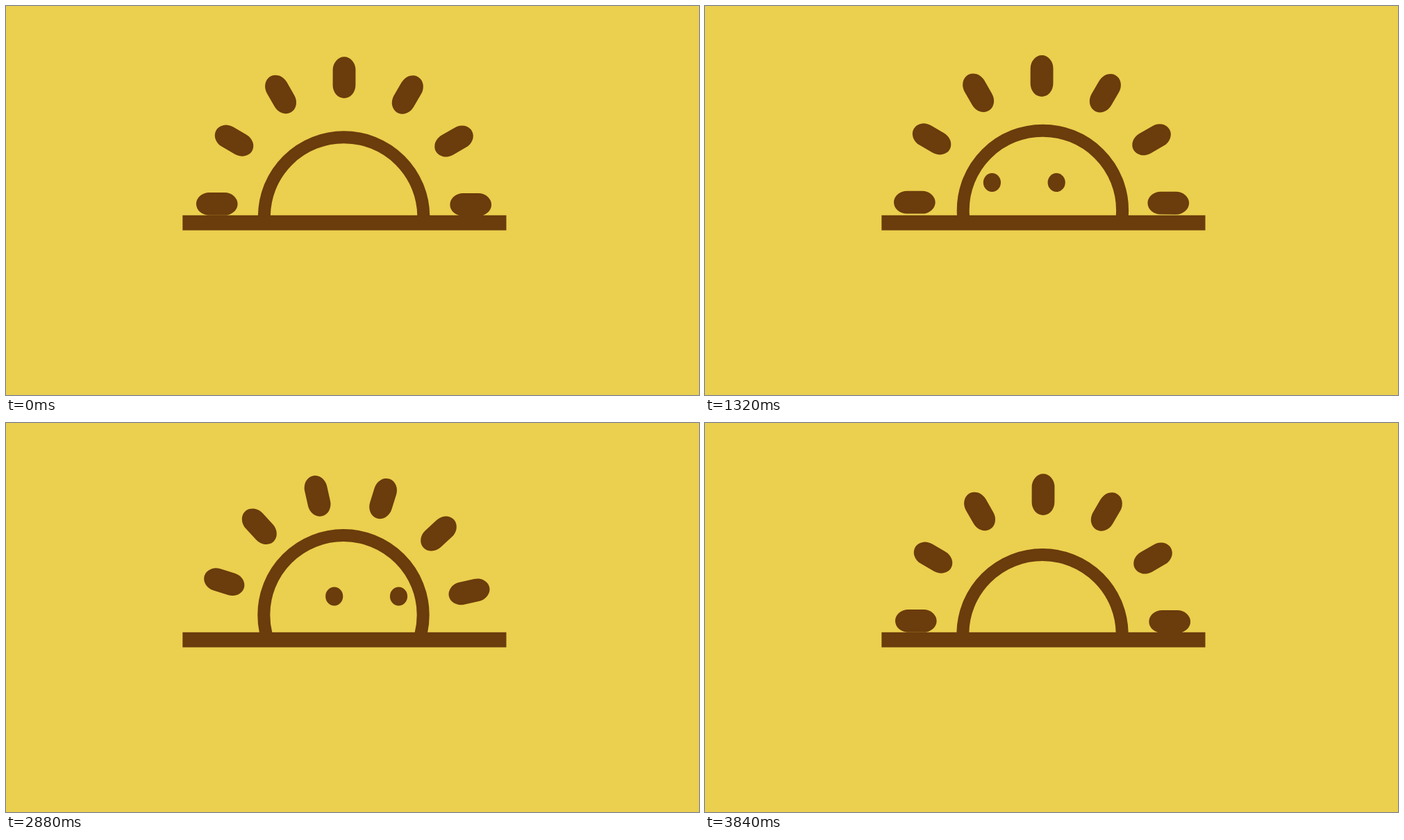
Recreate the animation shown at these times as an HTML page. Size 998 by 561 pixels, loop 4800 ms.

```html
<!DOCTYPE html>
<html lang="en">
<head>
<meta charset="utf-8">
<title>Sunrise</title>
<style>
  html, body { margin: 0; width: 100%; height: 100%; overflow: hidden; background: #ebcf4e; }
  svg { display: block; width: 100%; height: 100%; }
</style>
</head>
<body>
<svg viewBox="0 0 998 561" fill="#6b3c0c">
  <defs>
    <clipPath id="sky"><rect width="998" height="302"/></clipPath>
  </defs>
  <rect width="998" height="561" fill="#ebcf4e"/>
  <g clip-path="url(#sky)">
    <g id="rays"></g>
    <circle id="sun" r="114.7" fill="none" stroke="#6b3c0c" stroke-width="18"/>
    <g id="eyes">
      <ellipse rx="12.6" ry="13.5"/>
      <ellipse cx="92.8" rx="12.6" ry="13.5"/>
    </g>
  </g>
  <rect x="254.3" y="301.8" width="466.2" height="21.7"/>
</svg>
<script>
  const LOOP = 4800, START = 480, STEP = 40, STEPS = 84, PEAK = 60;
  const PIVOT = [486.65, 283.85];
  const NS = 'http://www.w3.org/2000/svg';
  const byId = id => document.getElementById(id);
  const rays = byId('rays'), sun = byId('sun'), eyes = byId('eyes');

  // The ring of rays sits slightly off its pivot, so it wobbles as it turns.
  for (let i = 0; i < 12; i++) {
    const ray = document.createElementNS(NS, 'rect');
    const attrs = {
      x: -16.4, y: -212.6, width: 32.8, height: 59.7, rx: 16.4, ry: 19,
      transform: `translate(-0.15 2.1) rotate(${i * 30 + 0.16})`
    };
    for (const name in attrs) ray.setAttribute(name, attrs[name]);
    rays.appendChild(ray);
  }

  // Left eye path: step, x, y, then speed in x and y per step.
  const path = [
    [0, 394, 317, 1, -3.9],
    [11, 405.4, 277.2, 1, -2.95],
    [32, 426.2, 243, 1.77, -0.5],
    [46, 458.2, 243.5, 1.66, 0.2],
    [60, 472.7, 250, 0.5, 0.8]
  ];
  const sunset = [485, 317];

  const lerp = (a, b, u) => a + (b - a) * u;

  function hermite(p0, v0, p1, v1, u) {
    const w = 1 - u;
    return w * w * ((1 + 2 * u) * p0 + u * v0) + u * u * ((3 - 2 * u) * p1 - w * v1);
  }

  function eyeAt(n) {
    if (n >= PEAK) {
      const u = (n - PEAK) / (STEPS - PEAK), last = path[path.length - 1];
      return [lerp(last[1], sunset[0], u), lerp(last[2], sunset[1], u)];
    }
    const i = path.findIndex(p => p[0] > n);
    const a = path[i - 1], b = path[i], h = b[0] - a[0], u = (n - a[0]) / h;
    return [1, 2].map(k => hermite(a[k], a[k + 2] * h, b[k], b[k + 2] * h, u));
  }

  function sunAt(n) {
    if (n < PEAK) return [lerp(486.6, 486, n / PEAK), lerp(303.9, 276.7, n / PEAK)];
    return [486, lerp(276.7, 304.7, (n - PEAK) / (STEPS - PEAK))];
  }

  function draw(ms) {
    const n = Math.max(0, Math.min(STEPS, Math.floor((ms % LOOP - START) / STEP)));
    rays.setAttribute('transform', `translate(${PIVOT}) rotate(${n * 360 / STEPS})`);
    const [cx, cy] = sunAt(n);
    sun.setAttribute('cx', cx);
    sun.setAttribute('cy', cy);
    eyes.setAttribute('transform', `translate(${eyeAt(n)})`);
  }

  const t0 = performance.now();
  function tick() {
    draw(performance.now() - t0);
    requestAnimationFrame(tick);
  }
  tick();
</script>
</body>
</html>
```
